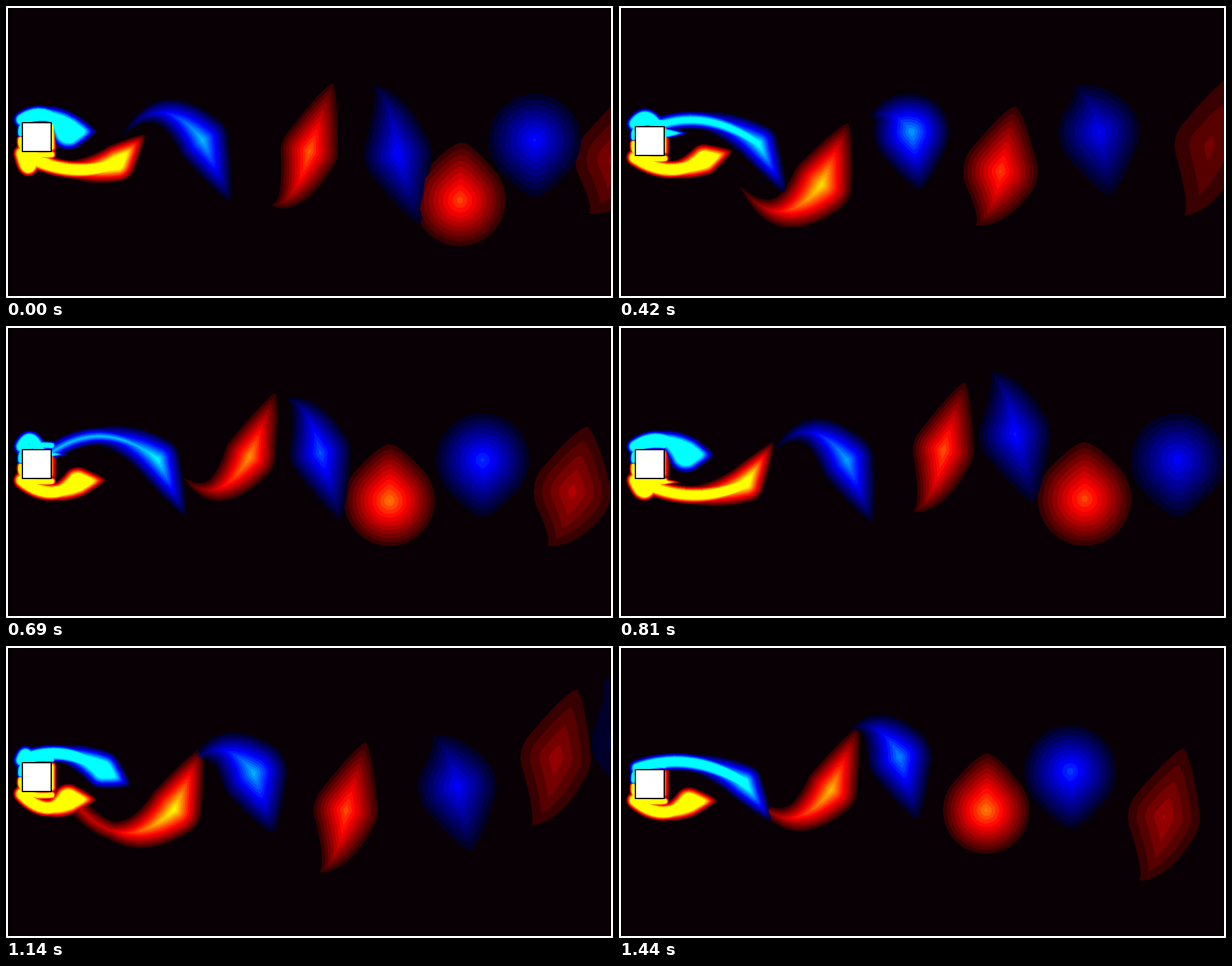
An HTML page with a canvas that plays this animation: 611 by 294 pixels, repeating every 1.47 s.

```html
<!DOCTYPE html>
<html lang="en">
<head>
<meta charset="utf-8">
<title>Vortex street behind an oscillating square</title>
<style>
html, body { margin: 0; width: 100%; height: 100%; overflow: hidden; background: #fff; }
canvas { display: block; }
</style>
</head>
<body>
<canvas id="stage" width="611" height="294"></canvas>
<script>
const ctx = document.getElementById('stage').getContext('2d');
const LOOP = 1470, STEP = 30, LEVELS = 18, SAMPLES = 24;
const SPEED = 0.69, SWING_PERIOD = 375, SWING = 14.8, MID_Y = 146.3;
const RED = 1, BLUE = -1;

const clamp = (v, lo, hi) => Math.min(hi, Math.max(lo, v));
const mix = (a, b, s) => a + (b - a) * s;
const mixPoint = (a, b, s) => [mix(a[0], b[0], s), mix(a[1], b[1], s)];
const smooth = (v, lo, hi) => {
  const s = clamp((v - lo) / (hi - lo), 0, 1);
  return s * s * (3 - 2 * s);
};
const bodyShift = t => -SWING * Math.cos(2 * Math.PI * t / SWING_PERIOD);

// Shed vortices: moment of release, height when released, height far downstream.
const shed = (sign, list) => list.map(([birth, lane, farLane]) => {
  const phase = birth / SWING_PERIOD - (sign === RED ? 0.33 : 0);
  const tall = 0.5 - 0.5 * Math.cos(2 * Math.PI * phase);
  return { sign, birth, lane, farLane, tall };
});

const vortices = [
  ...shed(RED, [
    [-887, 155, 155], [-662, 190, 196], [-441, 148, 141], [-136, 166, 167], [131, 180, 174],
    [338, 133, 113], [645, 160, 172], [905, 165, 166], [1136, 145, 145], [1400, 160, 160]
  ]),
  ...shed(BLUE, [
    [-771, 135, 135], [-571, 165, 143], [-280, 135, 127], [-5, 124, 135], [233, 143, 97],
    [482, 135, 142], [782, 128, 126], [1033, 112, 110], [1278, 145, 145]
  ])
];

function levelColor(sign, k) {
  const c = sign === RED ? 56 + 30 * (k - 1) : 40 + 30 * (k - 1);
  const main = Math.min(255, c), green = clamp(c - 255, 0, 255);
  return sign === RED ? `rgb(${main},${green},0)` : `rgb(0,${green},${main})`;
}

// A vortex is two curved arms that taper away from its core, plus the
// sheet that feeds it from the body until it breaks off.
function vortexArms({ sign, birth, lane, farLane, tall }, t) {
  const drift = SPEED * (t - birth);
  if (drift < -120) return [];
  const x = drift < 0 ? 62 * Math.exp(drift / 110) : drift + 62 * Math.exp(-drift / 75);
  if (x > 720) return [];

  const shift = bodyShift(t);
  const nearLane = MID_Y + sign * 14 + 0.4 * shift;
  const y = mix(nearLane, mix(lane, farLane, smooth(x, 200, 500)), smooth(x, 70, 180));
  const core = [x, y];
  const at = ([dx, dy]) => [x + dx, y + sign * dy];

  const age = smooth(x, 180, 360), free = smooth(x, 110, 190);
  const corner = [16, MID_Y + shift + sign * 17];
  const tail = at(mixPoint([-85, 0], [-25, mix(22, 70, tall)], age));
  const tailBend = at(mixPoint([-45, 55], [-5, mix(10, 55, tall)], age));
  const middle = mixPoint(corner, core, 0.5);
  const end = mixPoint(corner, tail, free);
  const bend = mixPoint([middle[0], middle[1] + sign * 22], tailBend, free);

  const [headX, headY] = mixPoint([28, -62], [22 * tall, mix(-55, -70, tall)], age);
  const head = at([headX, headY * smooth(x, 60, 170)]);

  const radius = mix(46, 34, tall) * Math.min(1.02, 0.3 + x / 560) * Math.exp(Math.min(0, drift) / 60);
  const strength = Math.max(2, 19 - x * mix(0.02, 0.028, tall) + 22 * Math.exp(-(((x - 50) / 60) ** 2)));
  return [
    { sign, path: [core, bend, end], radius, strength, taper: 1.1 },
    { sign, path: [core, mixPoint(core, head, 0.5), head], radius, strength, taper: 0.8 },
    { sign, path: [core, bend, end], radius: 9, strength: 32 * (1 - free), taper: 0 }
  ];
}

// Thin layers that stay on the faces of the body.
function bodyLayers(t) {
  const y = MID_Y + bodyShift(t), swing = bodyShift(t) / SWING;
  const rim = sign => ({
    sign, path: [[15, y + sign * 3], [13, y + sign * 21], [46, y + sign * 18]],
    radius: 4.5, strength: 28, taper: 0
  });
  const base = {
    sign: swing < 0 ? RED : BLUE, path: [[46, y - 11], [46, y], [46, y + 11]],
    radius: 5, strength: 22 * Math.abs(swing), taper: 0
  };
  return [rim(BLUE), rim(RED), base];
}

// Circles along the arm; tapered arms also get shorter at higher levels.
function armCircles({ path: [a, b, c], radius, taper }, scale) {
  const reach = taper ? scale : 1;
  return Array.from({ length: SAMPLES }, (_, i) => {
    const u = i / (SAMPLES - 1), s = u * reach;
    const [x, y] = mixPoint(mixPoint(a, b, s), mixPoint(b, c, s), s);
    return [x, y, radius * scale * (1 - u) ** taper];
  });
}

function fillLevel(arm, k) {
  const scale = 1 - (k - 1) / arm.strength;
  if (!(scale > 0) || arm.strength <= 0) return;
  const circles = armCircles(arm, scale);
  ctx.beginPath();
  circles.forEach(([x, y, r], i) => {
    ctx.moveTo(x + r, y);
    ctx.arc(x, y, r, 0, 2 * Math.PI);
    if (i === SAMPLES - 1) return;
    const [qx, qy, e] = circles[i + 1];
    const length = Math.hypot(qx - x, qy - y) || 1;
    const nx = (y - qy) / length, ny = (qx - x) / length;
    ctx.moveTo(x - nx * r, y - ny * r);
    ctx.lineTo(qx - nx * e, qy - ny * e);
    ctx.lineTo(qx + nx * e, qy + ny * e);
    ctx.lineTo(x + nx * r, y + ny * r);
    ctx.closePath();
  });
  ctx.fillStyle = levelColor(arm.sign, k);
  ctx.fill();
}

function draw(t) {
  ctx.fillStyle = '#fff';
  ctx.fillRect(0, 0, 611, 294);
  ctx.save();
  ctx.beginPath();
  ctx.rect(2, 2, 607, 290);
  ctx.clip();
  ctx.fillStyle = '#080004';
  ctx.fillRect(0, 0, 611, 294);

  const arms = vortices.flatMap(v => vortexArms(v, t)).concat(bodyLayers(t));
  for (let k = 1; k <= LEVELS; k++) arms.forEach(arm => fillLevel(arm, k));

  const top = Math.round(MID_Y + bodyShift(t) - 14.5) + 0.5;
  ctx.fillStyle = '#fff';
  ctx.fillRect(16.5, top, 29, 29);
  ctx.strokeStyle = '#000';
  ctx.lineWidth = 1.3;
  ctx.strokeRect(16.5, top, 29, 29);
  ctx.restore();
}

const start = performance.now();
function tick() {
  const t = (performance.now() - start) % LOOP;
  draw(Math.floor(t / STEP) * STEP);
  requestAnimationFrame(tick);
}
tick();
</script>
</body>
</html>
```
